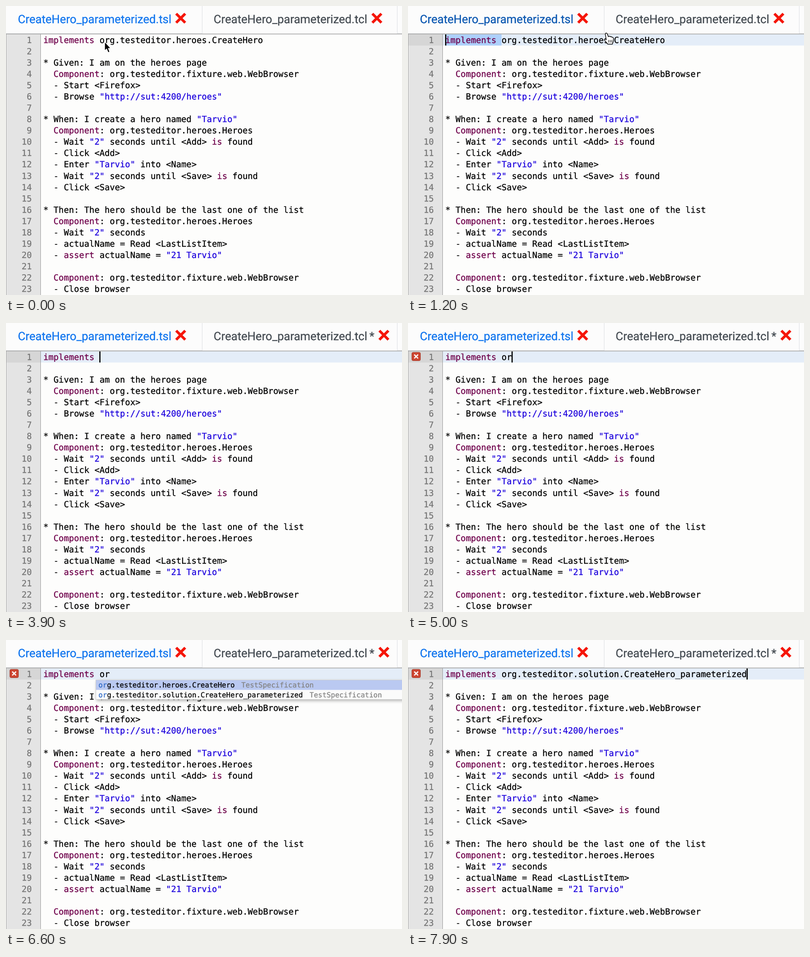
These frames come from a looping animation (875x640 px, 8000 ms). An HTML page:

```html
<!DOCTYPE html>
<html lang="en">
<head>
<meta charset="utf-8">
<title>Editor completion</title>
<style>
html, body { margin: 0; width: 100%; height: 100%; overflow: hidden; background: #fdfdfc; }
svg { display: block; }
text { white-space: pre; fill: var(--ink); stroke: var(--ink); stroke-width: .3px; text-rendering: geometricPrecision; }
tspan { fill: var(--ink); stroke: var(--ink); }
.code { font: 18.75px "DejaVu Sans Mono", monospace; --ink: #000; }
.num { --ink: #757575; text-anchor: end; }
.key { --ink: #6f004b; }
.str { --ink: #1c00dd; }
.tab { font: 25.6px Roboto, sans-serif; --ink: #434a51; }
#tab1 { --ink: #0f74ee; }
#tab1.hover { --ink: #0956b0; }
.pop { font: 15.64px "DejaVu Sans Mono", monospace; --ink: #000; }
.match { --ink: #2d69c7; }
.meta { --ink: #838383; }
#popup { filter: drop-shadow(2px 3px 3px rgba(0, 0, 0, .28)); }
</style>
</head>
<body>
<svg id="stage" width="875" height="640" viewBox="0 0 875 640">
  <defs>
    <path id="cross" d="M-10 -10L10 10M10 -10L-10 10" stroke="#f51508" stroke-width="6"/>
  </defs>
  <rect width="875" height="640" fill="#fdfdfc"/>

  <rect y="62" width="76" height="578" fill="#e4e4e4"/>
  <g id="active">
    <rect y="62.5" width="76" height="25" fill="#d6d6d6"/>
    <rect x="77" y="62.5" width="798" height="25" fill="#e4edf8"/>
  </g>
  <rect id="selection" y="62.5" height="25" fill="#add0fb"/>
  <path d="M76.5 62V640" stroke="#999"/>
  <path d="M.5 62V640" stroke="#a8a8a8"/>
  <g id="lines"></g>
  <rect id="caret" y="63" width="2.6" height="24.5"/>

  <g id="marker">
    <rect x="8.5" y="65" width="19" height="18.5" rx="3" fill="#cc4531" stroke="#a43a2b"/>
    <path d="M13.8 70L22.2 78.4M22.2 70L13.8 78.4" stroke="#fff" stroke-width="2.5"/>
  </g>

  <g id="popup">
    <rect x="198.5" y="88.5" width="720" height="43" fill="#fbfbfb" stroke="#cfcfcf"/>
    <rect id="choice" x="199" width="720" height="21.5" fill="#bac9f1"/>
    <g id="items"></g>
  </g>

  <rect width="875" height="61" fill="#fcfcfc"/>
  <path d="M433.5 0V61M864.5 0V61" stroke="#dcdfe2"/>
  <path d="M0 60.5H433M865 60.5H875" stroke="#e2e4e6"/>
  <path d="M0 62H875" stroke="#a3a3a3" stroke-width="1.4"/>
  <text id="tab1" class="tab" x="26.3" y="37.5">CreateHero_parameterized.tsl</text>
  <use href="#cross" x="386" y="27"/>
  <text class="tab" x="458.8" y="37.5">CreateHero_parameterized.tcl</text>
  <text id="star" class="tab" x="803" y="37.5">*</text>
  <use id="cross2" href="#cross" y="27"/>

  <g id="mouse" stroke-linejoin="round" stroke-linecap="round">
    <path id="arrow" d="M0 0V20L4.4 16 7.6 24 11.2 22.5 8 14.8H13.5Z" stroke="#fff" stroke-width="1.3"/>
    <g id="hand" fill="#fff" stroke="#000">
      <path d="M-4 2.5C-4.5 -.5 -.5 -1 .5 2L2.7 8C3.5 6.3 6 6.5 6.8 8.2 8 7 10 7.5 10.6 9.4 12.5 8.6 14 10 14 12.5L13.6 18.5 11.5 24.5H1.5L-4 18C-8 13.5 -5.5 11.5 -2 14.5Z" stroke-width="1.5"/>
      <path d="M3.5 15.5V20.5M7 15.5V20.5M10.3 15.5V20.5" stroke-width="1.1"/>
    </g>
    <g id="beam" fill="none">
      <path d="M-5 -12Q0 -12 0 -9Q0 -12 5 -12M0 -9V9M-5 12Q0 12 0 9Q0 12 5 12M-3 4H3" stroke="#fff" stroke-width="4"/>
      <path d="M-5 -12Q0 -12 0 -9Q0 -12 5 -12M0 -9V9M-5 12Q0 12 0 9Q0 12 5 12M-3 4H3" stroke="#000" stroke-width="2"/>
    </g>
  </g>
</svg>
<script>
const LOOP = 8000, STEP = 100;
const LEFT = 82.5, CHAR = 11.288, BASE = 81.6, PITCH = 25.08, BAR = 62;
const PRESS = 600, CLEAR = 2700, ERROR = 4300, TYPE_O = 4700, TYPE_R = 4900;
const POPUP = 5500, NEXT = 6700, ACCEPT = 7500;
const ANCHOR = 11;
const FIRST = "org.testeditor.heroes.CreateHero";
const SECOND = "org.testeditor.solution.CreateHero_parameterized";
const HERO = "Tarvio";

const source = `implements ${FIRST}

* Given: I am on the heroes page
  Component: org.testeditor.fixture.web.WebBrowser
  - Start <Firefox>
  - Browse "http://sut:4200/heroes"

* When: I create a hero named "${HERO}"
  Component: org.testeditor.heroes.Heroes
  - Wait "2" seconds until <Add> is found
  - Click <Add>
  - Enter "${HERO}" into <Name>
  - Wait "2" seconds until <Save> is found
  - Click <Save>

* Then: The hero should be the last one of the list
  Component: org.testeditor.heroes.Heroes
  - Wait "2" seconds
  - actualName = Read <LastListItem>
  - assert actualName = "21 ${HERO}"

  Component: org.testeditor.fixture.web.WebBrowser
  - Close browser`.split("\n");

const $ = id => document.getElementById(id);

function add(parent, tag, cls, text, attrs = {}) {
  const el = document.createElementNS("http://www.w3.org/2000/svg", tag);
  if (cls) el.setAttribute("class", cls);
  for (const name in attrs) el.setAttribute(name, attrs[name]);
  el.textContent = text;
  parent.append(el);
  return el;
}

function paint(el, line) {
  el.textContent = "";
  for (const part of line.split(/("[^"]*"|\b(?:implements|Component|is|assert)\b)/)) {
    if (!part) continue;
    const cls = part[0] === '"' ? "str" : /^(implements|Component|is|assert)$/.test(part) ? "key" : "";
    add(el, "tspan", cls, part);
  }
}

const rows = source.map((line, i) => {
  const y = BASE + i * PITCH;
  add($("lines"), "text", "code num", i + 1, { x: 57, y });
  const row = add($("lines"), "text", "code", "", { x: LEFT, y });
  paint(row, line);
  return row;
});

[FIRST, SECOND].forEach((name, i) => {
  const y = 105 + 22 * i;
  const item = add($("items"), "text", "pop", "", { x: 204.3, y });
  add(item, "tspan", "match", name.slice(0, 2));
  add(item, "tspan", "", name.slice(2));
  add($("items"), "text", "pop meta", "TestSpecification", { x: 204.3 + name.length * 9.416 + 14.5, y });
});

// time, x, y of the pointer's hot spot
const path = [
  [0, 218, 79], [400, 209, 76], [600, 206, 75], [900, 330, 72], [1200, 440, 60],
  [1600, 570, 14], [1800, 606, 20], [1900, 618, 45], [2000, 630, 69], [2100, 632, 71], [LOOP, 632, 71]
];
const blinkStarts = [PRESS, 900, 1200, 2000, CLEAR, TYPE_O, TYPE_R, ACCEPT];

function pointer(t) {
  const i = path.findIndex(p => p[0] > t);
  const [a, b] = [path[i - 1], path[i]];
  const k = (t - a[0]) / (b[0] - a[0]);
  return [a[1] + (b[1] - a[1]) * k, a[2] + (b[2] - a[2]) * k];
}

function typed(t) {
  if (t < CLEAR) return FIRST;
  if (t < TYPE_O) return "";
  if (t < TYPE_R) return "o";
  return t < ACCEPT ? "or" : SECOND;
}

const show = (id, on) => { $(id).style.display = on ? "" : "none"; };
let shownLine = source[0];

function draw(t) {
  const [x, y] = pointer(t);
  const above = y < BAR;
  const line = "implements " + typed(t);
  if (line !== shownLine) paint(rows[0], shownLine = line);

  // dragging above the first row puts the caret at its start
  let col = line.length;
  if (t < CLEAR) col = above ? 0 : Math.max(0, Math.min(col, Math.round((x - LEFT) / CHAR)));
  const since = t - blinkStarts.filter(s => s <= t).pop();
  $("caret").setAttribute("x", LEFT + col * CHAR - .5);
  show("caret", t >= PRESS && since % 1000 < 500);
  show("active", t >= PRESS);

  show("selection", t >= PRESS && t < CLEAR);
  $("selection").setAttribute("x", LEFT + Math.min(col, ANCHOR) * CHAR);
  $("selection").setAttribute("width", Math.abs(col - ANCHOR) * CHAR);

  show("mouse", t < CLEAR);
  $("mouse").setAttribute("transform", `translate(${x} ${y})`);
  show("arrow", t < PRESS);
  show("hand", above);
  show("beam", t >= PRESS && !above);
  $("tab1").classList.toggle("hover", above && x < 445);

  const dirty = t >= CLEAR;
  show("star", dirty);
  $("cross2").setAttribute("x", dirty ? 835 : 819.5);
  show("marker", t >= ERROR);
  show("popup", t >= POPUP && t < ACCEPT);
  $("choice").setAttribute("y", t < NEXT ? 89 : 110.5);
}

const start = performance.now();
function tick() {
  const t = (performance.now() - start) % LOOP;
  draw(Math.floor(t / STEP) * STEP);
  requestAnimationFrame(tick);
}
tick();
</script>
</body>
</html>
```
